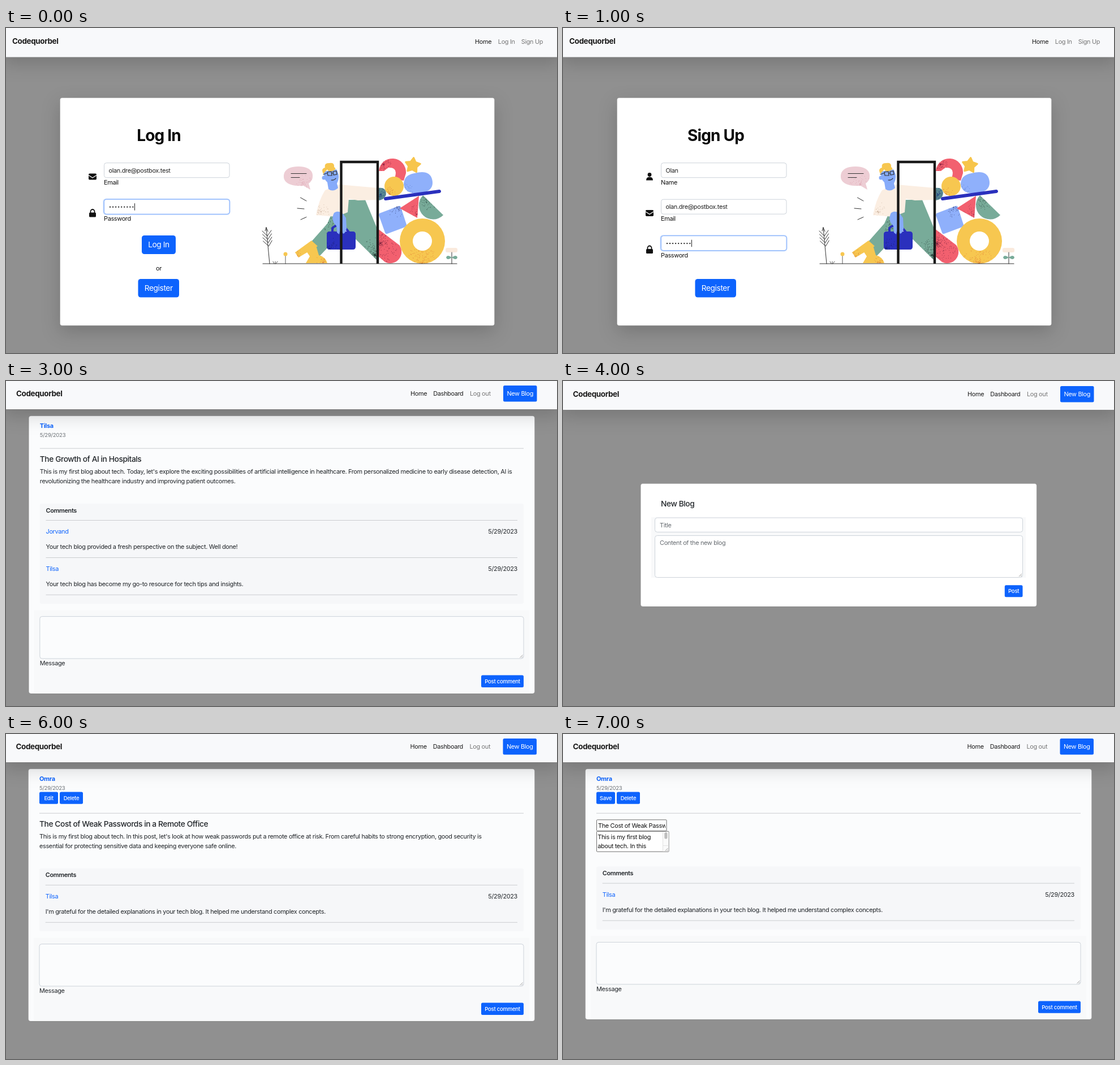
Animation, 974 px wide and 575 px high, one loop 8000 ms. Source, as an HTML page:

```html
<!DOCTYPE html>
<html lang="en">
<head>
<meta charset="utf-8">
<title>Blog walkthrough</title>
<style>
  html, body { margin: 0; width: 100%; height: 100%; overflow: hidden; background: #909090; }
  svg { display: block; width: 974px; height: 575px; }
  text { font-family: Inter, Roboto, sans-serif; letter-spacing: -.03em; white-space: pre; }
  .lift { filter: drop-shadow(0 11px 16px rgba(0, 0, 0, .175)); }
</style>
</head>
<body>
<svg id="stage" viewBox="0 0 974 575"></svg>
<script>
const BLUE = '#0d63fd', INK = '#212529', GRAY = '#70757a', RULE = '#cbcdd0', FIELD = '#cdd3da';
const BRAND = 'Codequorbel', DATE = '5/29/2023';

// ---------- drawing helpers, all return SVG markup ----------
const rect = (x, y, w, h, fill, extra = '') =>
  `<rect x="${x}" y="${y}" width="${w}" height="${h}" fill="${fill}" ${extra}/>`;

const label = (x, y, str, { size = 10.9, fill = INK, weight = 400, anchor = 'start' } = {}) =>
  `<text x="${x}" y="${y}" font-size="${size}" fill="${fill}" font-weight="${weight}" text-anchor="${anchor}">${str}</text>`;

const path = (d, fill = 'none', stroke = 'none', width = 1, extra = '') =>
  `<path d="${d}" fill="${fill}" stroke="${stroke}" stroke-width="${width}" ${extra}/>`;

const circle = (x, y, r, fill, extra = '') => `<circle cx="${x}" cy="${y}" r="${r}" fill="${fill}" ${extra}/>`;

const rule = (x1, x2, y) => path(`M${x1} ${y}H${x2}`, 'none', RULE);

const card = (x, y, w, h, fill, cls = 'lift') =>
  rect(x, y, w, h, fill, `rx="4" stroke="#000" stroke-opacity=".16" stroke-width=".7" class="${cls}"`);

const field = (x, y, w, h, fill = '#fff', stroke = FIELD) =>
  rect(x, y, w, h, fill, `rx="4" stroke="${stroke}"`);

const grip = (x, y) => path(`M${x - 6} ${y - 1}l5-5M${x - 3} ${y - 1}l2-2`, 'none', '#888', .8);

const button = (x, y, w, h, str, size, weight = 400) =>
  rect(x, y, w, h, BLUE, `rx="${h > 30 ? 4.5 : 2.5}"`) +
  label(x + w / 2, y + h / 2 + size * .36, str, { size, weight, fill: '#fff', anchor: 'middle' });

// ---------- grainy illustration ----------
let seed = 7, clips = 0;
const random = () => (seed = seed * 16807 % 2147483647) / 2147483647;

function grainy(d, fill, x, y, spread, count = 150, tint = '#222') {
  let dots = '';
  for (let i = 0; i < count; i++) {
    const a = random() * Math.PI * 2, r = spread * random() ** 1.2;
    dots += `M${(x + r * Math.cos(a)).toFixed(1)} ${(y + r * Math.sin(a)).toFixed(1)}h.8`;
  }
  const id = 'clip' + clips++;
  return `<clipPath id="${id}">${path(d, '#000', 'none', 1, 'clip-rule="evenodd"')}</clipPath>` +
    path(d, fill, 'none', 1, 'fill-rule="evenodd"') +
    `<g clip-path="url(#${id})">${path(dots, 'none', tint, .8)}</g>`;
}

function star(cx, cy, outer, inner) {
  const pts = Array.from({ length: 10 }, (_, i) => {
    const a = i * Math.PI / 5 - 1.45, r = i % 2 ? inner : outer;
    return `${cx + r * Math.cos(a)} ${cy + r * Math.sin(a)}`;
  });
  return path(`M${pts.join('L')}Z`, '#f7c54b', '#f7c54b', 3, 'stroke-linejoin="round"');
}

function illustration() {
  const red = '#f2606f', green = '#78ab99', yellow = '#f7c750', blue = '#8fb0fb', navy = '#2a30bd', cream = '#fbeee2';
  const line = (d, w = 1) => path(d, 'none', '#333', w, 'stroke-linecap="round"');
  const disc = (x, y, r) => `M${x - r} ${y}a${r} ${r} 0 1 0 ${2 * r} 0a${r} ${r} 0 1 0 ${-2 * r} 0Z`;
  const chevrons = [0, 1, 2, 3].map(i => `M${453 + i * .5} ${359 + i * 6}l${9 + i * .3} 9l${7 - i * .4}-10`).join('');
  return [
    // plants and speech bubble
    line('M466 417L460 353M460 353l-2 6M460 353l3 7' + chevrons),
    line('M474 417l-2-4M476 417v-4M477 417l3-4M494 417V402', .8),
    circle(494, 400, 3.5, yellow),
    grainy('M517 245C534 245 543 252 542 263C542 269 538 273 535 275L538 286L526 279C503 281 490 273 491 262C491 251 501 245 517 245Z', '#edcdd4', 525, 276, 18, 60, '#d99aa8'),
    line('M504 257.500H531M504 264.500H519', 1.1),
    line('M520.500 300L531 306M515 319L527 320M521 339L531 334.500'),
    // stacked shapes
    grainy('M659 253A24 24 0 0 1 707 257L703 270L686 268Q695 246 676 247L668 253Z', red, 667, 241, 13, 110, '#8d2340'),
    star(719, 243, 13.500, 7.500),
    grainy(disc(686, 280, 17), yellow, 677, 294, 13, 90, '#d97735'),
    grainy('M722 257Q748 250 753 267Q758 286 738 291Q706 297 703 277Q703 260 722 257Z', blue, 706, 289, 15, 60, '#5575cf'),
    path('M671 302L766 289', 'none', navy, 6, 'stroke-linecap="round"'),
    grainy('M660 328L694 315Q697 314 698 317L708 348Q709 351 706 352L674 364Q671 365 670 362L659 331Z', blue, 690, 316, 19, 130, '#333c74'),
    grainy('M696 319L730 297L727 336Z', red, 726, 330, 20, 100, '#9d2a48'),
    grainy('M737 296L773 331A25 25 0 0 1 737 296Z', green, 746, 303, 19, 160, '#29453e'),
    grainy(disc(736, 377, 40) + disc(736, 377, 17), yellow, 735, 417, 31, 260, '#df7431'),
    rect(777, 389, 21, 8, '#faeadd', 'rx="3"'),
    line('M788 397V417'),
    path('M788 406Q780 400 778 406Q780 412 788 406Q796 400 798 406Q796 412 788 406', green),
    // legs and shoe
    grainy('M584 309L615 320L603 352L553 405L530 389L568 346Z', green, 590, 350, 28, 260, '#1e2d29'),
    grainy('M511 397L540 376L551 386L517 406Z', yellow, 515, 404, 15, 70, '#d97735'),
    grainy('M529 392L548 385L553 402Q565 405 568 416H530L537 404Z', yellow, 560, 415, 14, 60, '#d97735'),
    grainy('M600 304H635L657 357V412L586 342Z', green, 652, 402, 32, 260, '#1e2d29'),
    grainy('M657 355L695 384A20 20 0 0 1 670 414L657 403Z', red, 661, 381, 36, 300, '#70203a'),
    // body and arm
    grainy('M564 287L590 277L612 279L658 283V304L622 305L606 302L604 326L584 334L548 331Q553 304 564 287Z', cream, 556, 325, 18, 60, '#c5a994'),
    grainy('M658 283Q671 281 672 292Q671 304 658 305Z', '#5c8c93', 662, 295, 13, 120, '#23417f'),
    // head
    path('M562 254Q561 268 568 273L570 285Q578 291 587 283L585 275Q592 263 584 250Z', '#86abfa'),
    circle(562, 265, 3.500, '#86abfa'),
    path('M561 258Q556 249 564 247Q562 239 571 239Q581 237 580 246Q586 250 577 253Q570 255 568 250Z', yellow),
    line('M568 255l7-1 1 7-7 0ZM578 254l6-1 1 6-6 1ZM576 257h2M567 257l-6 2M575 269q5 1 8-3', 1.2),
    // bag and hand
    path('M577 364V354Q592 340 608 364', 'none', navy, 4),
    grainy('M572 360H613Q618 360 618 365V387Q618 392 613 392H572Q567 392 567 387V365Q567 360 572 360Z', navy, 572, 390, 20, 90, '#151a62'),
    path('M580 327Q591 320 601 336L602 355Q599 366 595 363L592 352L589 365L585 362L584 350Q573 340 580 327Z', '#86abfa'),
    // door and ground
    path('M592.500 417V237H657V417', 'none', '#191919', 4.4),
    line('M454 417H797', 1.2)
  ].join('');
}

// ---------- page parts ----------
function nav(dy, brandX, linkX) {
  const y = 28 + dy;
  const bar = rect(-6, -20, 986, 72 + dy, '#f8f9fb', 'rx="4" class="lift"');
  const brand = label(brandX, y + .6, BRAND, { size: 13.5, weight: 700, fill: '#1b1b1b' });
  const link = (x, str, fill = '#1b1b1b') => label(x, y, str, { fill });
  const links = linkX
    ? link(linkX, 'Home') + link(linkX + 40.2, 'Dashboard') + link(linkX + 105, 'Log out', '#777') +
      button(linkX + 165 - (dy < 0 ? 1 : 0), 10 + dy, 59.5, 28.5, 'New Blog', 10.9)
    : link(829, 'Home') + link(869.8, 'Log In', '#777') + link(910.8, 'Sign Up', '#777');
  return bar + brand + links;
}

const mailIcon = y => rect(146, y - 5.5, 14, 11, '#111', 'rx="1.8"') +
  path(`M146 ${y - 2.5}L153 ${y + 2}L160 ${y - 2.5}`, 'none', '#fff', 1.2);
const lockIcon = y => rect(147, y - 1, 12, 8, '#111', 'rx="1.6"') +
  path(`M149.500 ${y}V${y - 3}a3.500 3.500 0 0 1 7 0V${y}`, 'none', '#111', 1.8);
const userIcon = y => circle(153, y - 3.5, 3.4, '#111') +
  path(`M147 ${y + 6.5}q0-6 6-6t6 6Z`, '#111');

function dots(y) {
  return Array.from({ length: 9 }, (_, i) => circle(184 + i * 5.05, y + .5, 1.15, '#222')).join('');
}

function entry(y, name, value, icon, focused) {
  const ring = focused ? rect(171.5, y - 1.5, 225, 29, '#bcd5fe', 'rx="5.5"') : '';
  const caret = focused ? path(`M227.500 ${y + 7}v12.500`, 'none', '#222') : '';
  const content = name === 'Password' ? dots(y + 13) : label(181.5, y + 17, value, { fill: '#222' });
  return ring + field(173.5, y, 221.5, 26, '#fff', focused ? '#86b0fb' : FIELD) + content + caret +
    label(173, y + 38, name, { fill: '#111' }) + icon(y + 24.3);
}

const account = (title, body) =>
  card(95.5, 123.5, 768, 403, '#fff') +
  label(270, 199.5, title, { size: 28, weight: 700, fill: '#080808', anchor: 'middle' }) +
  body + illustration() + nav(-.5, 11);

const mail = 'olan.dre@postbox.test';

const logIn = account('Log In',
  entry(238.7, 'Email', mail, mailIcon) +
  entry(303.2, 'Password', '', lockIcon, true) +
  button(240, 367, 60, 33, 'Log In', 13.75) +
  label(270, 429, 'or', { anchor: 'middle', fill: '#111' }) +
  button(233.5, 444, 72.5, 32.5, 'Register', 13.75));

const signUp = account('Sign Up',
  entry(238.7, 'Name', 'Olan', userIcon) +
  entry(303.2, 'Email', mail, mailIcon) +
  entry(367.7, 'Password', '', lockIcon, true) +
  button(233.5, 444, 72.5, 32.5, 'Register', 13.75));

const list = (top, titles) => titles.map((title, i) => {
  const y = top + i * 98.8;
  return card(75, y, 823, 87.5, '#fbfcff') +
    label(486.5, y + 22.5, DATE, { size: 9.6, fill: GRAY, anchor: 'middle' }) +
    rule(95, 878.5, y + 42.7) +
    label(486.5, y + 67.2, title, { size: 13.75, weight: 500, fill: '#0c0c0c', anchor: 'middle' });
}).join('');

function post({ x, author, head, ruleY, panelY, comments }) {
  const left = x + 10.7, end = panelY + 95.5 + (comments.length - 1) * 65.8 + 15.8;
  const area = end + 22.5, bottom = area + 136.5;
  const thread = comments.map(([name, str], i) => {
    const y = panelY + i * 65.8;
    return label(left, y + 53, name, { fill: BLUE }) +
      label(904, y + 53, DATE, { anchor: 'end' }) +
      label(left, y + 80, str) + rule(left, 904, y + 95.5);
  }).join('');
  return card(x - 19.5, 61.7, 954 - x + .5 - 0.5 + 0, bottom - 61.7, '#fbfcfd', '').replace(/width="[^"]+"/, `width="${934.5 - x + 19.5}"`) +
    label(x, 83, author, { weight: 700, fill: BLUE }) +
    label(x, 99, DATE, { size: 9.6, fill: GRAY }) +
    rule(x, 915, ruleY) + head +
    rect(x, panelY, 915 - x, end - panelY, '#f6f7f9', 'rx="3"') +
    label(left, panelY + 15.5, 'Comments', { weight: 600 }) +
    rule(left, 904, panelY + 29.5) + thread +
    rect(x - 10, area - 11, 935 - x, bottom - area + 10, '#f8f9fa') +
    field(x, area, 915 - x, 74.5, '#fbfcfd') + grip(914.5, area + 74) +
    label(x, area + 86.5, 'Message') +
    button(840, area + 104, 75, 21.3, 'Post comment', 9.6, 500);
}

const article = (x, y, title, lines) =>
  label(x, y, title, { size: 13.75, weight: 500 }) +
  lines.map((str, i) => label(x, y + 21.2 + i * 16.4, str)).join('');

const smallButtons = first =>
  button(59, 102.5, 33, 21.2, first, 9.6, 500) + button(95, 102.5, 41, 21.2, 'Delete', 9.6, 500);

const firstTitle = 'The Growth of AI in Hospitals';
const secondTitle = 'The Cost of Weak Passwords in a Remote Office';
const reply = [['Tilsa', "I'm grateful for the detailed explanations in your tech blog. It helped me understand complex concepts."]];

const readPost = post({
  x: 59.8, author: 'Tilsa', ruleY: 119.2, panelY: 217,
  head: article(59.8, 143, firstTitle, [
    "This is my first blog about tech. Today, let's explore the exciting possibilities of artificial intelligence in healthcare. From personalized medicine to early disease detection, AI is",
    'revolutionizing the healthcare industry and improving patient outcomes.'
  ]),
  comments: [
    ['Jorvand', 'Your tech blog provided a fresh perspective on the subject. Well done!'],
    ['Tilsa', 'Your tech blog has become my go-to resource for tech tips and insights.']
  ]
}) + nav(-2, 18, 715);

const ownPost = post({
  x: 59, author: 'Omra', ruleY: 140.2, panelY: 237.8, comments: reply,
  head: smallButtons('Edit').replace('x="59" ', 'x="59" ') + article(59, 164, secondTitle, [
    "This is my first blog about tech. In this post, let's look at how weak passwords put a remote office at risk. From careful habits to strong encryption, good security is",
    'essential for protecting sensitive data and keeping everyone safe online.'
  ])
}) + nav(-2, 17.5, 714.5);

const editor =
  '<clipPath id="titleBox"><rect x="61" y="152" width="120" height="19"/></clipPath>' +
  rect(59.5, 151.8, 123.5, 19.6, '#fff', 'stroke="#707070" rx="1"') +
  `<g clip-path="url(#titleBox)">${label(62, 165.7, secondTitle, { fill: '#111' })}</g>` +
  rect(59.5, 172.2, 127.5, 36, '#fff', 'stroke="#707070" rx="1"') +
  label(61.3, 186, 'This is my first blog', { fill: '#111' }) +
  label(61.3, 202.3, 'about tech. In this', { fill: '#111' }) +
  rect(176.5, 173, 10, 34.5, '#fafafa') + path('M176.500 173V207.500M176.500 197.500H186.500', 'none', '#e2e2e2') +
  rect(179.3, 174, 5.2, 11.5, '#bdbdbd', 'rx="2.6"') + grip(186.5, 208);

const editPost = post({
  x: 59, author: 'Omra', ruleY: 140.2, panelY: 234.6, comments: reply,
  head: smallButtons('Save') + editor
}) + nav(-2, 17.5, 714.5);

const newPost =
  card(137.3, 181.5, 700, 217.5, '#fff', '') +
  label(173, 222, 'New Blog', { size: 13.75, weight: 500 }) +
  rect(156, 241, 662, 107, '#f8f9fa') +
  field(162.5, 242, 650, 25.3) + label(171, 258.7, 'Title', { fill: '#666b70' }) +
  field(162.5, 273.5, 650, 74) + label(171, 290, 'Content of the new blog', { fill: '#666b70' }) +
  grip(812, 347) + button(780.8, 361.3, 31.7, 21, 'Post', 9.6, 500) + nav(-1, 17.5, 715);

const home = list(129.3, [
  firstTitle, 'Networking: Before the Switchboards', 'The Turn of Adaptive Displays',
  'The Value of Plain Log Analysis', 'The Habits of Patient Testers'
]) + nav(0, 17, 721.8);

const dashboard = list(130, [
  secondTitle, 'Conversational Helpers: Improving Support Conversations',
  'The Value of Field Notes in Workshop Planning', 'The Outlook for Printed Circuits'
]) + nav(1, 17, 721.8);

// ---------- playback: one screen per second ----------
const STEP = 1000;
const screens = [logIn, signUp, home, readPost, newPost, dashboard, ownPost, editPost];
const stage = document.getElementById('stage');
stage.innerHTML = rect(0, 0, 974, 575, '#909090') + screens.map(s => `<g class="screen">${s}</g>`).join('');
const groups = [...stage.querySelectorAll('.screen')];
const start = performance.now();

function show() {
  const current = Math.floor((performance.now() - start) / STEP) % groups.length;
  groups.forEach((g, i) => { g.style.display = i === current ? '' : 'none'; });
  requestAnimationFrame(show);
}
show();
</script>
</body>
</html>
```
